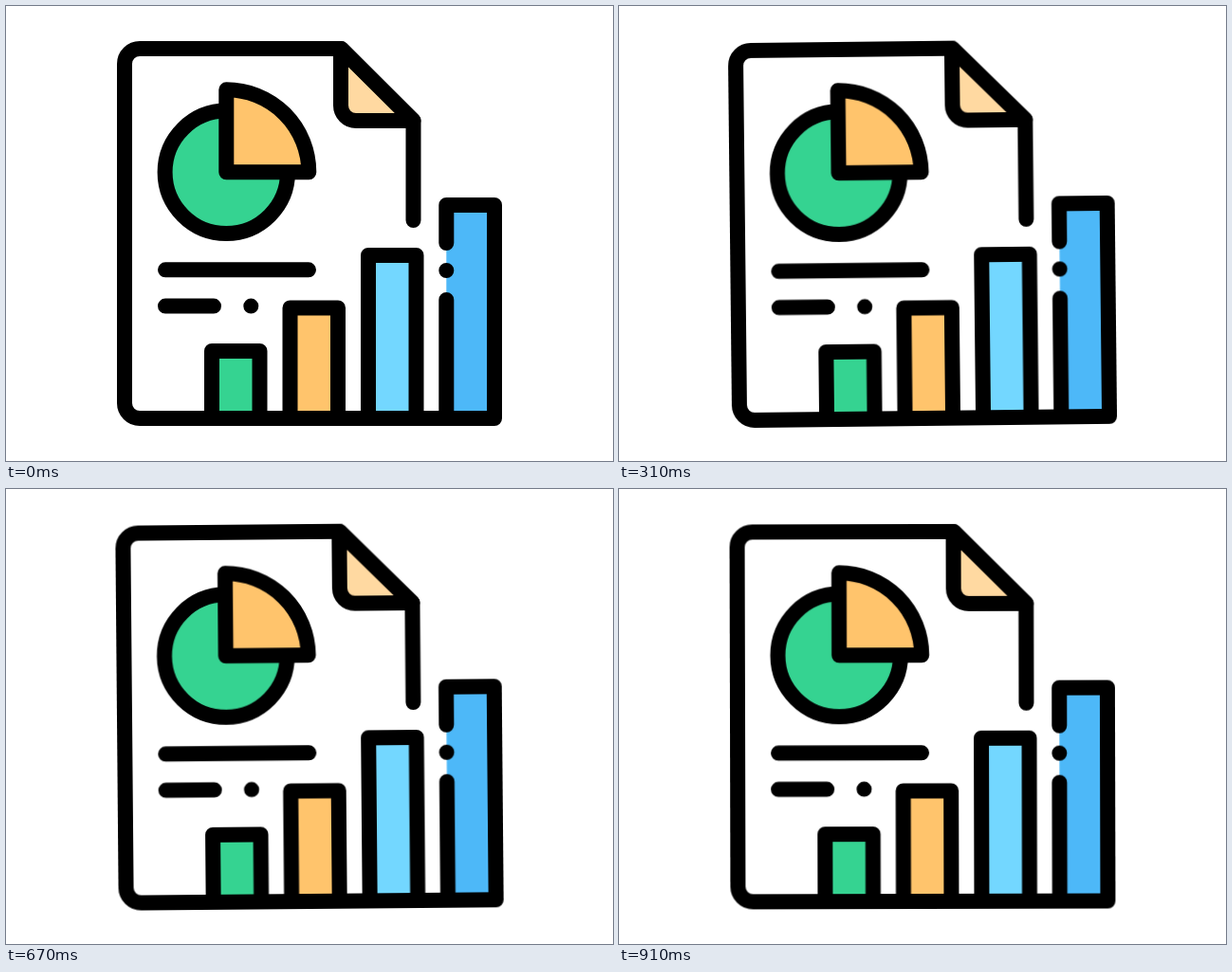
Write an HTML page that moves like this. It is 640 px wide and 480 px high and loops after 0.97 s.

```html
<!DOCTYPE html>
<html lang="en">
<head>
<meta charset="utf-8">
<title>Report icon</title>
<style>
  html, body { margin: 0; width: 100%; height: 100%; overflow: hidden; background: #fff; }
  svg { display: block; width: 640px; height: 480px; }
  #icon {
    transform-origin: 320px 240px;
    fill: none;
    stroke: #000;
    stroke-width: 16;
    stroke-linecap: round;
    stroke-linejoin: round;
  }
  .green { fill: #35d391; }
  .orange { fill: #ffc46c; }
  .cream { fill: #ffd9a1; }
  .sky { fill: #73d7ff; }
  .blue { fill: #4db8f8; stroke: none; }
</style>
</head>
<body>
<svg viewBox="0 0 640 480">
  <g id="icon">
    <!-- bars -->
    <path class="green" d="M217 435V364H267.5V435"/>
    <path class="orange" d="M299.5 435V318.5H350V435"/>
    <path class="sky" d="M382 435V263H432.5V435"/>
    <path class="blue" d="M464.3 210H515V435H464.3Z"/>
    <path d="M464.3 435V310M464.3 279h.01"/>

    <!-- page with folded corner -->
    <path class="cream" d="M353 45V105a16 16 0 0 0 16 16H429.5Z"/>
    <path d="M429.5 226V121L353.5 45H141a16 16 0 0 0 -16 16V419a16 16 0 0 0 16 16H515V210H464.3V250"/>

    <!-- pie -->
    <circle class="green" cx="232.3" cy="175.3" r="64.7"/>
    <path class="orange" d="M232.3 88.3a87 87 0 0 1 87 87h-87z"/>

    <!-- text lines -->
    <path d="M168 278.3H319M168 316.6H219M258.3 316.6h.01"/>
  </g>
</svg>
<script>
  const LOOP = 970, SWING = 2.1, QUARTER = 3.04;

  // Triangle wave in degrees: 0, +, -, +, -, 0
  const angle = k => {
    const p = (k / QUARTER) % 10;
    if (p < 1) return SWING * p;
    const leg = Math.floor(p), sign = leg % 2 ? 1 : -1;
    return leg < 4
      ? sign * SWING * (1 - 2 * (p - leg))
      : -SWING * (5 - p);
  };

  // [start ms, position along the swing]; one position is skipped early on
  const steps = [[0, 0], [60, 1], [120, 3]];
  for (let k = 4; k <= 15; k++) steps.push([250 + (k - 4) * 60, k]);

  const frames = steps.map(([ms, k]) => ({
    offset: ms / LOOP,
    transform: `rotate(${angle(k)}deg)`,
    easing: 'step-end'
  }));
  frames.push({ offset: 1, transform: 'rotate(0deg)' });

  document.getElementById('icon').animate(frames, { duration: LOOP, iterations: Infinity });
</script>
</body>
</html>
```
